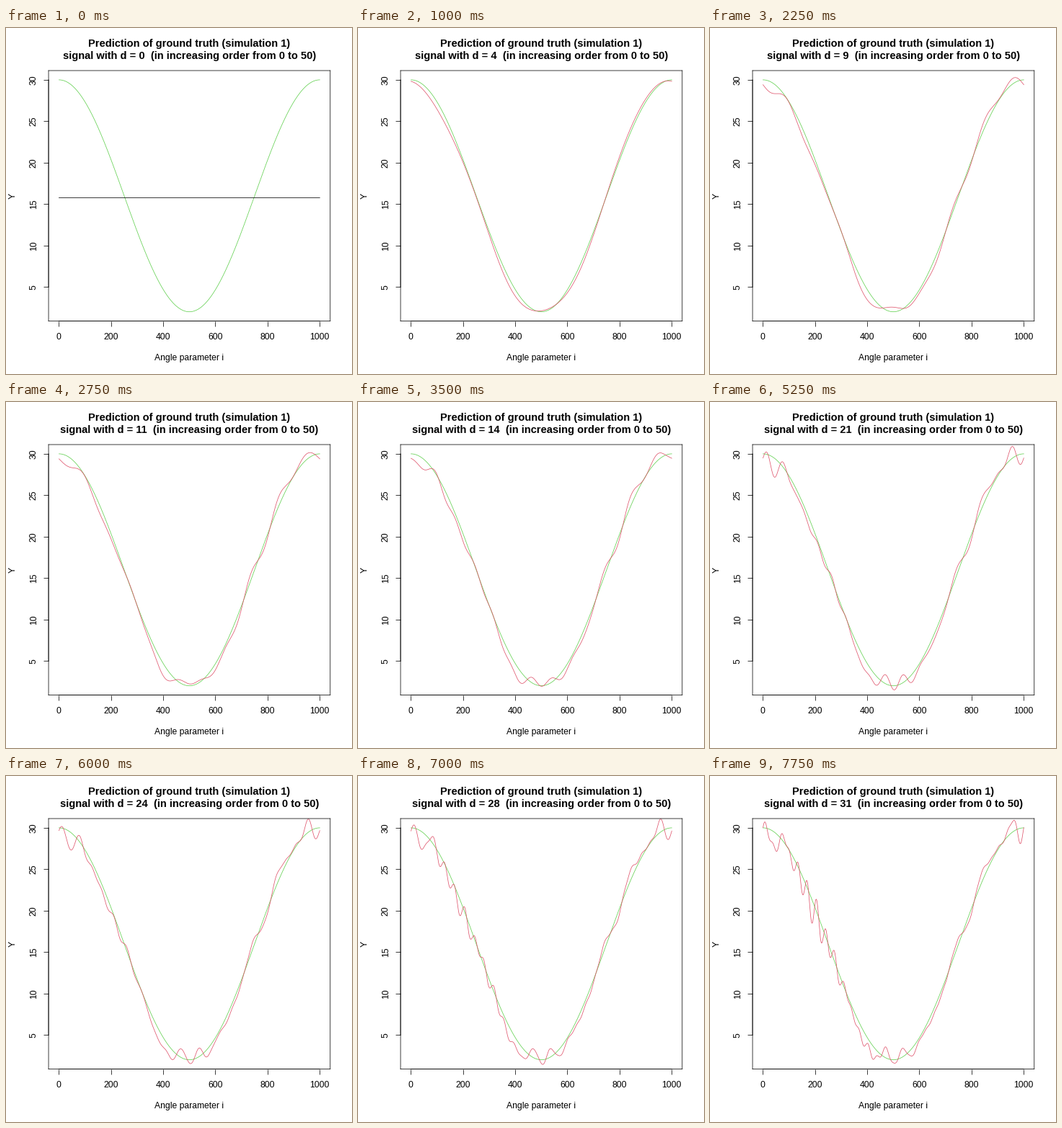
Write a matplotlib script that moves like this. It is 480 px wide and 480 px high and loops after 8 s.

```python
import matplotlib.pyplot as plt
import numpy as np
from matplotlib.animation import FuncAnimation

SIZE, DPI = 480, 72  # at 72 dpi a point is a pixel
LEFT, RIGHT, TOP, BOTTOM = 59.04, 449.76, 59.04, 406.56
Y_LOW, Y_HIGH = 0.88, 31.12
PX_PER_Y = (BOTTOM - TOP) / (Y_HIGH - Y_LOW)
MAX_DEGREE = 31
TURN = 1000
THIN = 0.75

# Noise in the observations: (centre, height, width)
BUMPS = [(90, -0.5, 50), (180, -0.8, 35), (390, -1.4, 35), (495, 0.5, 30),
         (585, -0.5, 25), (650, -0.7, 25), (870, 0.5, 60)]
# Rippling noise: (centre, height, width, period)
RIPPLES = [(25, -1.2, 45, 150), (790, -1, 70, 105), (503, -1, 60, 71),
           (16, 1.4, 60, 64), (265, 0.7, 35, 52),
           (205, 2.3, 50, 35.3), (402, 0.5, 40, 34.5), (4, 0.9, 30, 36)]

plt.rcParams.update({
    "font.family": "Liberation Sans",
    "font.size": 12.15,
    "path.snap": False,
})


def packet(centre, height, width, period=np.inf):
    """A ripple under a bell curve, wrapped around the turn."""
    offset = (np.arange(TURN) - centre + TURN / 2) % TURN - TURN / 2
    bell = np.exp(-0.5 * (offset / width) ** 2)
    return height * bell * np.cos(2 * np.pi * offset / period)


noise = sum(packet(*shape) for shape in BUMPS + RIPPLES)
coefs = np.fft.rfft(noise)[:MAX_DEGREE + 1] / TURN
coefs[1:] *= 2

steps = np.arange(1, TURN + 1)
angle = np.linspace(0, 2 * np.pi, TURN)
truth = 16 + 14 * np.cos(angle)
waves = np.exp(1j * np.outer(np.arange(MAX_DEGREE + 1), angle))


def prediction(degree):
    """Best trigonometric fit: only harmonics up to the degree get through."""
    signal = truth if degree else 16
    return signal + (coefs[:degree + 1] @ waves[:degree + 1]).real


fig = plt.figure(figsize=(SIZE / DPI, SIZE / DPI), dpi=DPI, facecolor="white")
ax = fig.add_axes([LEFT / SIZE, 1 - BOTTOM / SIZE,
                   (RIGHT - LEFT) / SIZE, (BOTTOM - TOP) / SIZE])
ax.set_xlim(1 - 39.96, 1000 + 39.96)
ax.set_ylim(Y_LOW, Y_HIGH)
ax.set_xticks(range(0, 1001, 200))
ax.set_yticks(range(5, 31, 5))
ax.tick_params(length=7.2, width=THIN, labelbottom=False, labelleft=False)
for spine in ax.spines.values():
    spine.set_linewidth(THIN)

# The axis lines lie over the box and darken it.
axis_line = dict(color="black", lw=THIN, clip_on=False)
ax.plot([0, 1000], [Y_LOW, Y_LOW], **axis_line)
ax.plot([1 - 39.96] * 2, [5, 30], **axis_line)


def label(x, y, text, **style):
    """Centred text whose baseline passes through a pixel position."""
    return fig.text(x / SIZE, 1 - y / SIZE, text, ha="center", va="baseline",
                    rotation_mode="anchor", **style)


middle_x, middle_y = (LEFT + RIGHT) / 2, (TOP + BOTTOM) / 2
for value in ax.get_xticks():
    label(73.15 + 0.36214 * value, 432.4, f"{value:g}")
for value in ax.get_yticks():
    label(41.8, TOP + (Y_HIGH - value) * PX_PER_Y, f"{value:g}", rotation=90)
label(middle_x, 461.2, "Angle parameter i")
label(13, middle_y, "Y", rotation=90)

bold = dict(fontsize=14.6, fontweight="bold")
label(middle_x, 26, "Prediction of ground truth (simulation 1)", **bold)
subtitle = label(middle_x, 43, "", **bold)

ax.plot(steps, truth, color="#61D04F", lw=THIN)
curve, = ax.plot([], [], lw=THIN)


def draw(degree):
    curve.set_data(steps, prediction(degree))
    curve.set_color("#DF536B" if degree else "black")
    subtitle.set_text(
        f"signal with d = {degree}  (in increasing order from 0 to 50)")
    return curve, subtitle


anim = FuncAnimation(fig, draw, frames=MAX_DEGREE + 1, interval=250,
                     repeat=True, repeat_delay=0, blit=False)
plt.show()
```
